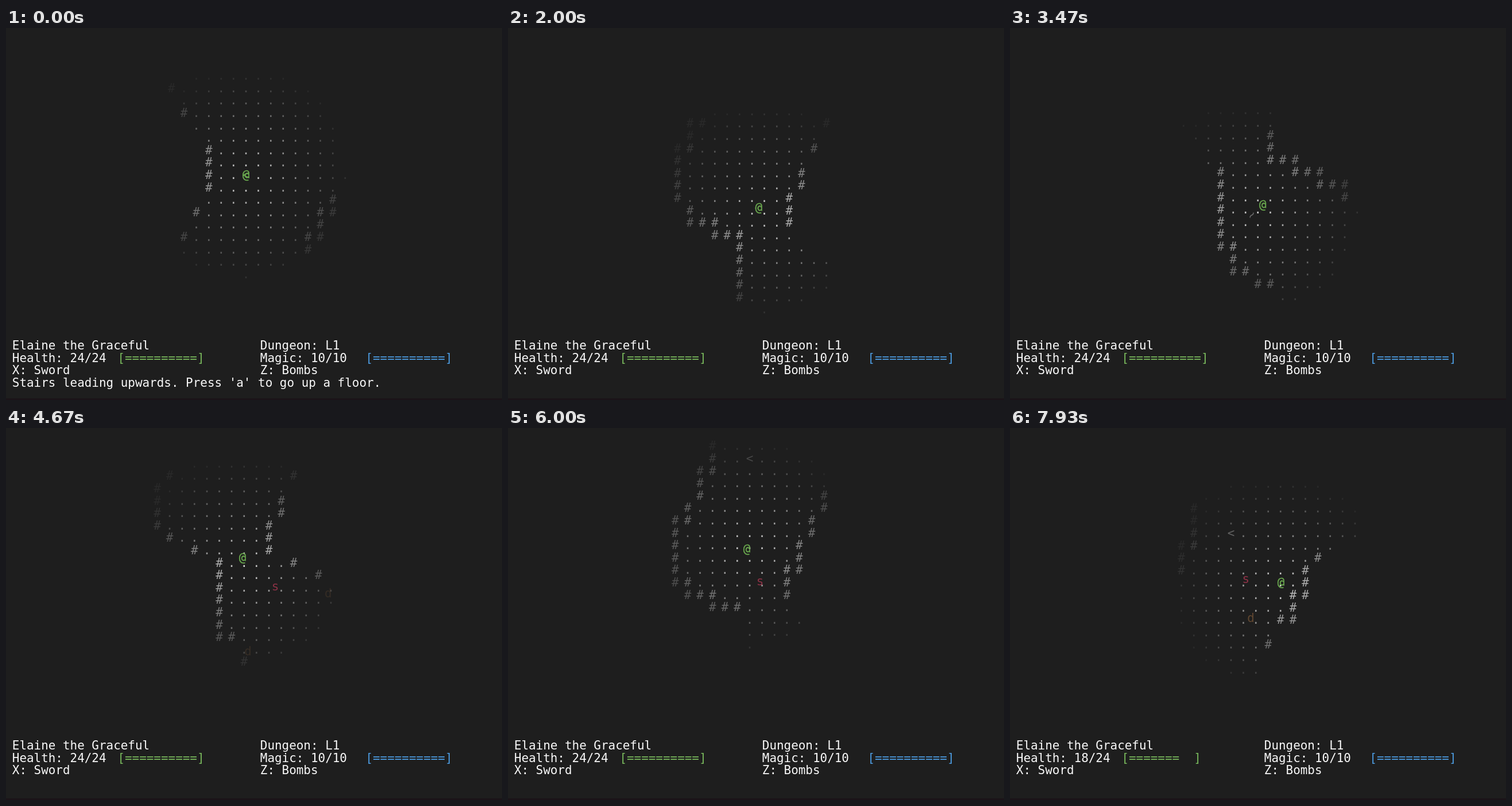
An HTML page for the animation above (8000 ms loop, 864 by 648 pixels).

```html
<!DOCTYPE html>
<html lang="en">
<head>
<meta charset="utf-8">
<title>Dungeon walk</title>
<style>
  html, body { margin: 0; width: 100%; height: 100%; overflow: hidden; background: #1e1e1e; }
  svg { display: block; width: 100%; height: 100%; }
  text { font: 20.93px "DejaVu Sans Mono", monospace; white-space: pre; }
  #world text { text-anchor: middle; }
</style>
</head>
<body>
<svg viewBox="0 0 864 648">
  <rect width="864" height="648" fill="#1e1e1e"/>
  <rect y="645" width="864" height="3" fill="#1b1418"/>
  <g id="world"></g>
  <g id="hud"></g>
</svg>
<script>
const LOOP = 8000, STEP = 200 / 3, CELL = 21.6, RADIUS = 8;
const CENTER = [421, 257], LAG = .55;
const GREEN = "#6aa84f", BROWN = "#8e633d";

// Cave outline as corner points: row, column
const LEFT = [[-7, -6.2], [-2, -3.45], [1, -3.4], [6, -5.9], [9, -6.4], [12, -1], [17, -.9], [19, .3], [21, 2.6]];
const RIGHT = [[0, 12], [2, 6.6], [9, 3.1], [11, 3], [16, 13]];

// Turning points: time, column, row
const HERO = [
  [0, 0, 0], [800, 0, 3.75], [2000, .55, 9.79], [3150, 2.8, 13.4], [3470, 2.38, 14.64],
  [3740, 1.7, 15.9], [4670, .87, 11.6], [5500, -.5, 8.9], [6000, -.23, 7.3],
  [7000, .8, 3], [7930, 4.03, 3.98],
];
const MONSTERS = [
  { glyph: "s", color: "#c43c5a", path: [[3600, 6.5, 15.5], [4670, 3.5, 13.9], [6000, .83, 9.9], [7930, 1.2, 3.7]] },
  { glyph: "d", color: BROWN, path: [[4660, 7.8, 14.5], [6900, 1.5, 11], [7930, 1.6, 6.85]] },
  { glyph: "d", color: BROWN, path: [[4400, 1.4, 19.5], [5000, 1.2, 18.7]] },
];

// Time and screen position of cell (0, 0)
const CAMERA = [
  [0, 418, 256], [800, 421, 234.7], [2000, 425, 101.6], [3470, 388.6, -8.2],
  [4670, 393.2, -24.4], [6000, 421, 53], [7930, 385, 183],
];

const world = document.getElementById("world");
const hud = document.getElementById("hud");

function segment(keys, t) {
  let i = 0;
  while (i < keys.length - 2 && t >= keys[i + 1][0]) i++;
  const [a, b] = [keys[i], keys[i + 1]];
  return { a, b, u: Math.max(0, Math.min(1, (t - a[0]) / (b[0] - a[0]))) };
}

function along(keys, t) {
  const { a, b, u } = segment(keys, t);
  return a.slice(1).map((v, k) => v + (b[k + 1] - v) * u);
}

// The camera trails the hero: its speed is the hero's distance from the centre over the lag.
function cameraAt(t) {
  const { a, b, u } = segment(CAMERA, t);
  const w = 1 - u, span = (b[0] - a[0]) / 1000;
  return [0, 1].map(k => {
    const pull = key => (CENTER[k] - key[k + 1] - along(HERO, key[0])[k] * CELL) / LAG * span;
    return w * w * (1 + 2 * u) * a[k + 1] + u * u * (3 - 2 * u) * b[k + 1] +
      u * w * (w * pull(a) - u * pull(b));
  });
}

function isWall(c, r) {
  return c <= Math.round(along(LEFT, r)[0]) || c >= Math.round(along(RIGHT, r)[0]);
}

// Cells reached by rays from the hero's cell; each ray ends at a wall.
function lightFrom(px, py) {
  const lit = new Map();
  for (let deg = 0; deg < 360; deg++) {
    const a = deg * Math.PI / 180, dx = Math.cos(a), dy = Math.sin(a);
    for (let d = 0; d <= RADIUS; d++) {
      const c = Math.floor(px + dx * d + 1e-9), r = Math.floor(py + dy * d + 1e-9);
      lit.set(c + "," + r, [c, r]);
      if (isWall(c, r)) break;
    }
  }
  return lit;
}

function label(glyph, x, y, fill, alpha = 1, extra = "") {
  const s = glyph.replace("<", "&lt;");
  return `<text x="${x.toFixed(2)}" y="${y.toFixed(2)}" fill="${fill}" opacity="${alpha.toFixed(3)}" ${extra}>${s}</text>`;
}

function drawWorld(t, hero) {
  const [ox, oy] = cameraAt(t);
  const [px, py] = hero.map(Math.round);
  const lit = lightFrom(px, py);
  const put = (glyph, c, r, fill, alpha, extra) =>
    label(glyph, ox + c * CELL, oy + r * CELL + 7, fill, alpha, extra);
  const glow = (c, r) => Math.max(.06, 1 - Math.hypot(c - px, r - py) / 9);
  let out = "";

  for (const [c, r] of lit.values()) {
    const stairs = !c && !r;
    const glyph = stairs ? "<" : isWall(c, r) ? "#" : ".";
    const onTop = stairs && !px && !py;
    out += put(glyph, c, r, onTop ? GREEN : "#d2d2d2", glow(c, r));
  }
  for (const { glyph, color, path } of MONSTERS) {
    if (t < path[0][0] || t > path[path.length - 1][0] + STEP) continue;
    const [c, r] = along(path, t);
    if (lit.has(Math.round(c) + "," + Math.round(r))) out += put(glyph, c, r, color, glow(c, r));
  }
  if (t > 3330 && t < 3600) {
    const turn = 140 - (t - 3467) * .4, a = turn * Math.PI / 180;
    const x = ox + hero[0] * CELL + 25 * Math.cos(a);
    const y = oy + hero[1] * CELL + 2 + 25 * Math.sin(a);
    out += label("~", x, y + 6.5, "#6c6c6c", 1, `transform="rotate(${turn - 190} ${x} ${y})"`);
  }
  out += put("@", ...hero, GREEN, 1, `stroke="${GREEN}" stroke-width=".4"`);
  world.innerHTML = out;
}

function drawHud(t, hero) {
  const line = (s, col, row, fill = "#f8f8f8") => label(s, col * CELL, 560.2 + row * CELL, fill);
  const bar = share => "[" + "=".repeat(share * 10) + " ".repeat(10 - share * 10) + "]";
  const hp = t < 7400 ? 24 : 18;
  const onStairs = hero.every(v => Math.round(v) === 0);
  hud.innerHTML =
    line("Elaine the Graceful", .5, 0) + line("Dungeon: L1", 20.5, 0) +
    line(`Health: ${hp}/24`, .5, 1) + line(bar(hp / 24), 9, 1, "#78b85c") +
    line("Magic: 10/10", 20.5, 1) + line(bar(1), 29, 1, "#4c9be0") +
    line("X: Sword", .5, 2) + line("Z: Bombs", 20.5, 2) +
    (onStairs ? line("Stairs leading upwards. Press 'a' to go up a floor.", .5, 3) : "");
}

let shown = -1;
function frame(now) {
  const tick = Math.floor((now + 5) % LOOP / STEP);
  if (tick !== shown) {
    shown = tick;
    const t = tick * STEP, hero = along(HERO, t);
    drawWorld(t, hero);
    drawHud(t, hero);
  }
  requestAnimationFrame(frame);
}
frame(0);
</script>
</body>
</html>
```
